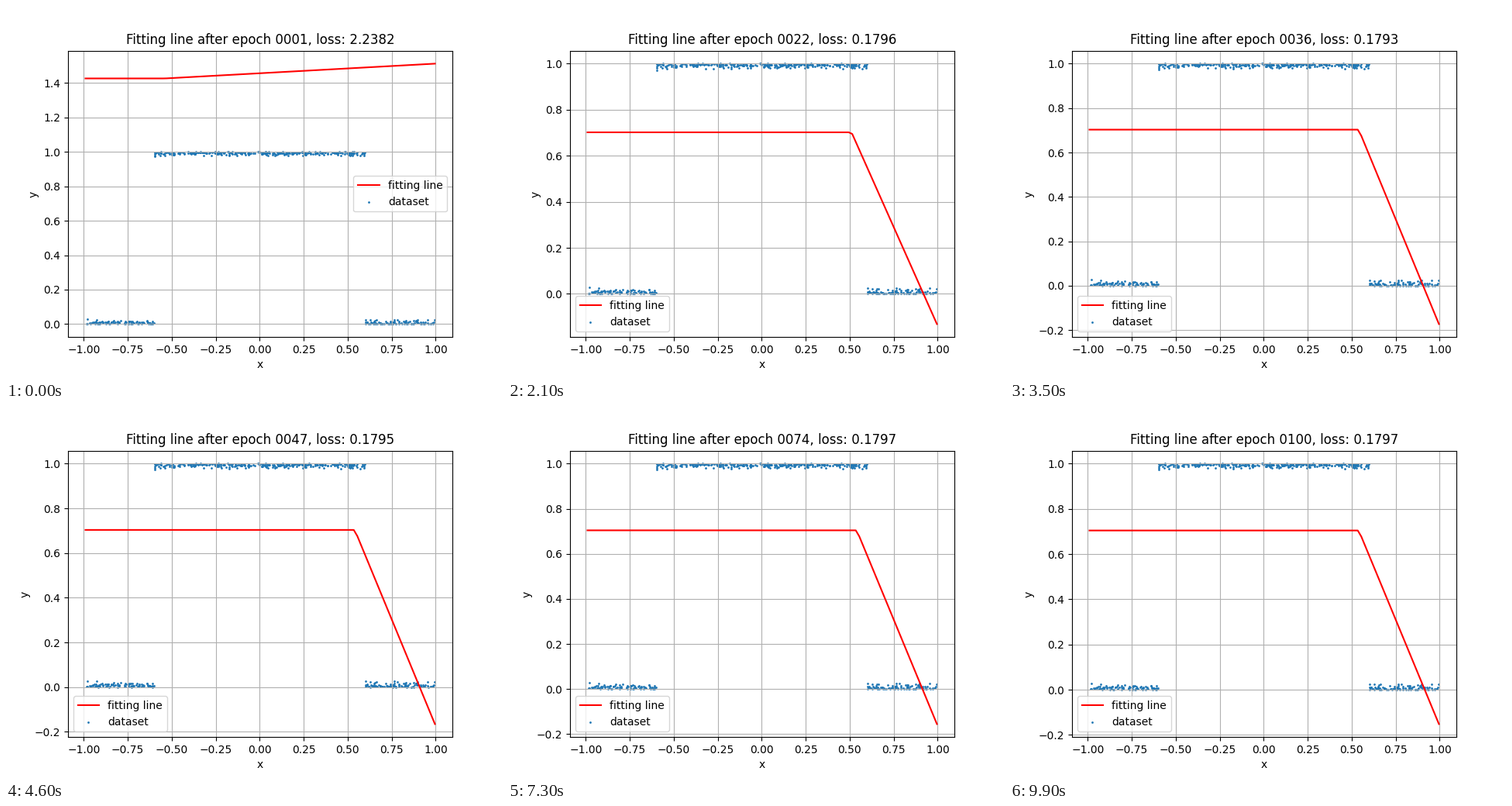
A matplotlib script that plays this animation: 640x480 px, repeating every 10000 ms.

```python
import matplotlib.pyplot as plt
import numpy as np
from matplotlib.animation import FuncAnimation

EPOCHS = 100
X_MIN, X_MAX = -0.9906, 0.9961


def make_dataset(count=500):
    """Noisy samples of a box function: 1 inside |x| < 0.6, else 0."""
    rng = np.random.default_rng(7)
    x = rng.uniform(X_MIN, X_MAX, count)
    noise = np.abs(rng.normal(0, 0.01, count))
    return x, np.where(np.abs(x) < 0.6, 1 - noise, noise)


def training_state(epoch):
    """Flat level, knee position, value at the right end, and loss."""
    t = epoch - 1
    kick = np.exp(-2 * t)                        # first big correction
    rest = 1 / (1 + np.exp((t - 12.13) / 3.4))   # knee still to be learned
    drift = np.exp(-t / 26.4)                    # slow settling
    level = 0.7045 - 0.006 * drift + 0.7285 * kick
    knee = 0.5405 - 1.12 * rest ** 1.35
    end = -0.15 + 0.86 * rest - 0.0885 * drift + 0.915 * kick
    loss = 0.17977 + 0.06 * rest ** 1.7 - 0.0017 * drift + 2.0029 * kick
    return level, knee, end, loss


def padded(lo, hi):
    pad = 0.05 * (hi - lo)
    return lo - pad, hi + pad


fig, ax = plt.subplots(figsize=(6.4, 4.8), dpi=100)
xs = np.linspace(X_MIN, X_MAX, 100)
line, = ax.plot(xs, xs, "r", label="fitting line")
ax.scatter(*make_dataset(), s=1, label="dataset")
ax.set_xlim(padded(X_MIN, X_MAX))
ax.set_xlabel("x")
ax.set_ylabel("y")
ax.grid(True)
ax.legend(loc="best")


def update(frame):
    epoch = frame + 1
    level, knee, end, loss = training_state(epoch)
    slope = (end - level) / (X_MAX - knee)
    ys = level + slope * np.maximum(0, xs - knee)
    line.set_ydata(ys)
    ax.set_ylim(padded(min(0, ys.min()), max(1, ys.max())))
    ax.set_title(f"Fitting line after epoch {epoch:04d}, loss: {loss:.4f}")
    return []


anim = FuncAnimation(fig, update, frames=EPOCHS, interval=100,
                     repeat=True, repeat_delay=0, blit=False)
plt.show()
```
